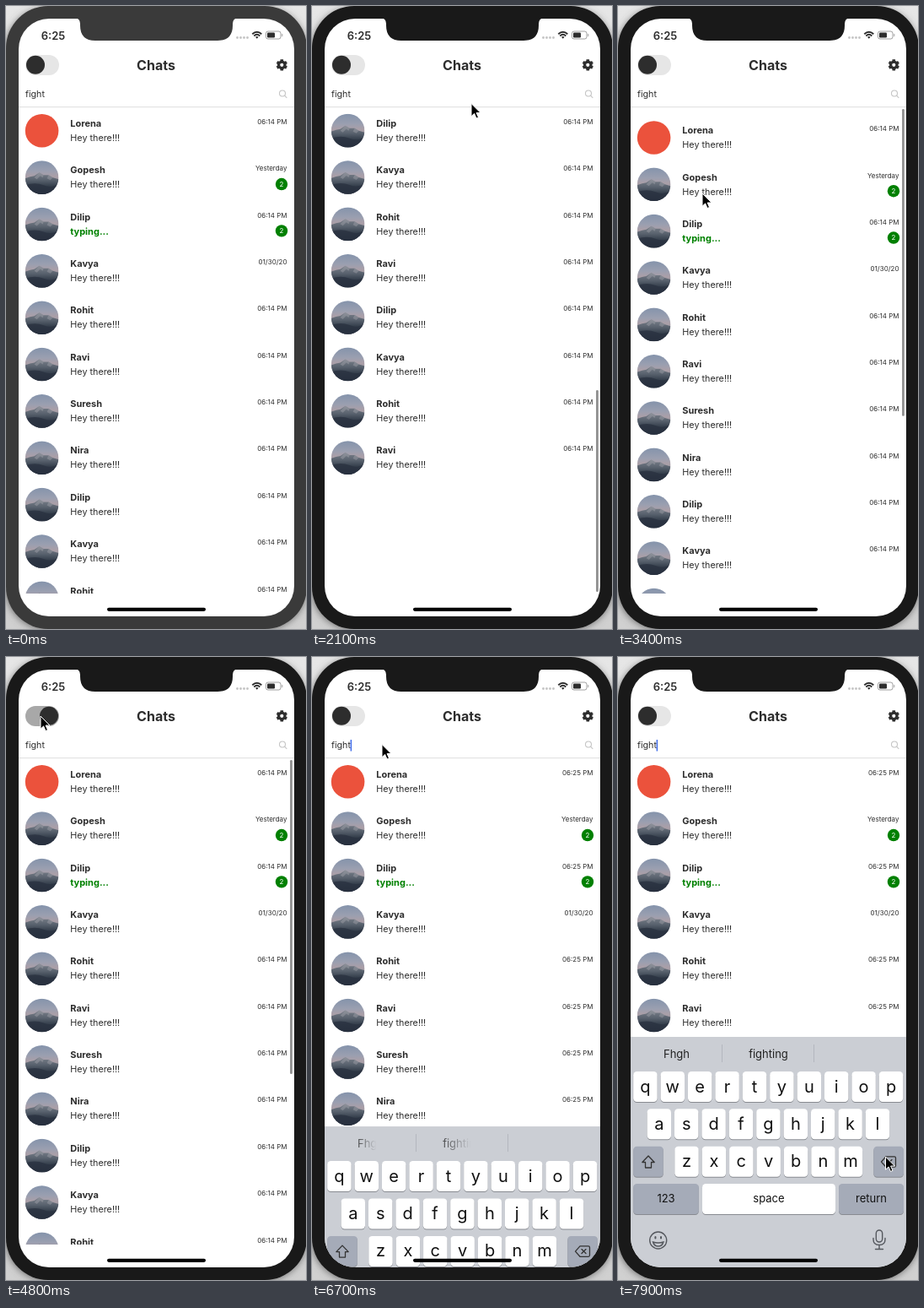
These frames come from a looping animation (356 px wide and 738 px high, 8 s). An HTML page:

```html
<!DOCTYPE html>
<html lang="en">
<head>
<meta charset="utf-8">
<title>Chat list</title>
<style>
html, body { margin: 0; width: 100%; height: 100%; overflow: hidden; background: #dcdcdc; }
svg { display: block; width: 100vw; height: 100vh; font-family: Inter, Roboto, sans-serif; }
.bg { fill: var(--bg); }
.fg { fill: var(--fg); }
.line { fill: none; stroke: #333; stroke-width: 1.3; stroke-linejoin: round; stroke-linecap: round; }
.mid { text-anchor: middle; }
.end { text-anchor: end; }
.name { font-size: 11px; font-weight: 700; }
.note { font-size: 10.8px; }
.time { font-size: 8px; }
.key { font-size: 20px; fill: #111; }
.label { font-size: 13px; fill: #111; }
</style>
</head>
<body>
<svg id="stage" viewBox="0 0 356 738" preserveAspectRatio="none">
  <defs>
    <linearGradient id="shade" x1="0" y1="0" x2="0" y2="1">
      <stop offset="0" stop-color="#e6e6e6"/><stop offset="1" stop-color="#d0d0d0"/>
    </linearGradient>
    <linearGradient id="sky" x1="0" y1="0" x2="0" y2="1">
      <stop offset="0" stop-color="#8493ab"/><stop offset=".3" stop-color="#9a9fb0"/>
      <stop offset=".46" stop-color="#aa9fa8"/><stop offset="1" stop-color="#8c8f99"/>
    </linearGradient>
    <linearGradient id="rock" x1="0" y1="0" x2="0" y2="1">
      <stop offset="0" stop-color="#7b818b"/><stop offset=".35" stop-color="#59626e"/>
      <stop offset=".6" stop-color="#38424f"/><stop offset="1" stop-color="#242d3b"/>
    </linearGradient>
    <linearGradient id="reveal">
      <stop offset="0" stop-color="#222"/><stop offset="1" stop-color="#222" stop-opacity="0"/>
    </linearGradient>
    <filter id="soft"><feGaussianBlur stdDeviation="5"/></filter>
    <clipPath id="round"><circle r="19.8"/></clipPath>
    <clipPath id="screen"><rect x="15" y="15" width="327" height="708" rx="36"/></clipPath>
    <clipPath id="view"><rect x="15" y="120" width="327" height="576"/></clipPath>
    <g id="photo" clip-path="url(#round)">
      <rect x="-20" y="-20" width="40" height="40" fill="url(#sky)"/>
      <path d="M-20 1L-14-1L-9-2L-3-6L2-3L8-3L13 0L20 2V20H-20Z" fill="url(#rock)"/>
      <path d="M-3-6L2-3L1 0L-2-2L-6 2L-9 0ZM8-3L13 0L10 3L6 1Z" fill="#a7a9b0" opacity=".4"/>
      <path d="M-20 9Q-8 5 2 9T20 7V20H-20Z" fill="#28313f" opacity=".75"/>
    </g>
  </defs>

  <rect width="356" height="738" fill="url(#shade)"/>
  <rect y="3" width="356" height="735" rx="50" fill="#555" filter="url(#soft)"/>
  <rect id="body" width="357" height="738" rx="50"/>

  <g clip-path="url(#screen)">
    <rect class="bg" x="15" y="15" width="327" height="708"/>
    <g clip-path="url(#view)"><g id="list"></g></g>
    <rect id="bar" x="337.1" width="2.7" rx="1.35" fill="#8d8d8d"/>

    <g class="fg">
      <text class="mid" x="56" y="39.5" font-size="13" font-weight="600">6:25</text>
      <text class="mid" x="178" y="75.7" font-size="16" font-weight="700">Chats</text>
      <text x="23" y="108.3" font-size="10.7">fight</text>
    </g>
    <g fill="#c5c5c5">
      <circle cx="274.5" cy="37.5" r="1.4"/><circle cx="278.5" cy="37.5" r="1.4"/>
      <circle cx="282.5" cy="37.5" r="1.4"/><circle cx="286.5" cy="37.5" r="1.4"/>
    </g>
    <g fill="none" stroke="var(--fg)">
      <path d="M292.3 33.2Q297.8 28.2 303.3 33.2M294.3 35.5Q297.8 32.2 301.3 35.5" stroke-width="1.9"/>
      <path d="M297.8 38.8L296 36.8Q297.8 35.4 299.6 36.8Z" fill="var(--fg)" stroke="none"/>
      <rect x="308.5" y="30" width="17.5" height="9" rx="2.4" stroke-opacity=".45"/>
      <rect x="310" y="31.5" width="9" height="6" rx="1.2" fill="var(--fg)" stroke="none"/>
      <path d="M327.8 33V36" stroke-opacity=".45"/>
      <g id="gear" transform="translate(327.3 69.8)">
        <circle r="3.7" stroke-width="3.2"/>
      </g>
    </g>
    <g fill="none" stroke="#c4c4c4" stroke-width="1.1">
      <circle cx="328" cy="103.5" r="3.5"/><path d="M330.6 106.1L333.3 108.8"/>
    </g>
    <path d="M15 119.7H342" stroke="#dedede"/>
    <rect id="track" x="23" y="58" width="40" height="24" rx="12"/>
    <circle id="knob" class="fg" cy="69.8" r="11"/>
    <rect id="caret" x="45.6" y="98" width="1.5" height="13.5" fill="#3f6bea"/>

    <g id="board"></g>
    <rect id="home" x="120" y="712.7" width="117" height="4.2" rx="2.1"/>
  </g>

  <path id="notch" d="M82 14Q88 15 88 21V23Q88 41 106 41H251Q269 41 269 23V21Q269 15 275 14Z"/>
  <path id="pointer" d="M0 0V15.2L3.6 11.9L6 17.5L8.5 16.4L6.1 11H11Z" fill="#000" stroke="#fff" stroke-linejoin="round"/>
</svg>

<script>
const LOOP = 8000, STEP = 100, PITCH = 55.35, MAX = 310, VIEW = 576;
const NS = "http://www.w3.org/2000/svg";
const $ = id => document.getElementById(id);
const stage = $("stage");

function add(parent, tag, attrs, text) {
  const el = document.createElementNS(NS, tag);
  for (const k in attrs) el.setAttribute(k, attrs[k]);
  if (text !== undefined) el.textContent = text;
  parent.appendChild(el);
  return el;
}
function set(id, attrs) {
  for (const k in attrs) $(id).setAttribute(k, attrs[k]);
}
const clamp = (v, a = 0, b = 1) => Math.min(b, Math.max(a, v));
const part = (t, a, b) => clamp((t - a) / (b - a));
const smooth = p => p * p * (3 - 2 * p);
const easeOut = p => 1 - (1 - p) ** 3;
const mix = (a, b, p) => a + (b - a) * p;

// Chat rows
const names = ("Lorena Gopesh Dilip Kavya Rohit Ravi Suresh Nira " +
  "Dilip Kavya Rohit Ravi Dilip Kavya Rohit Ravi").split(" ");
const clocks = [];
names.forEach((name, i) => {
  const row = add($("list"), "g", { transform: `translate(0 ${i * PITCH})` });
  if (i) add(row, "use", { href: "#photo", x: 42.6, y: 147.8 });
  else add(row, "circle", { cx: 42.6, cy: 147.8, r: 19.8, fill: "#eb523c" });
  add(row, "text", { class: "name fg", x: 76.3, y: 143 }, name);
  if (i === 2) add(row, "text", { class: "name", x: 76.3, y: 160, fill: "#008000" }, "typing...");
  else add(row, "text", { class: "note fg", x: 76.3, y: 160 }, "Hey there!!!");
  const day = { 1: "Yesterday", 3: "01/30/20" }[i];
  const label = add(row, "text", { class: "time fg end", x: 333.5, y: 140 }, day || "");
  if (!day) clocks.push(label);
  if (i === 1 || i === 2) {
    add(row, "circle", { cx: 327, cy: 155.7, r: 7.2, fill: "#008000" });
    add(row, "text", { class: "mid", x: 327, y: 158.5, "font-size": 8, fill: "#fff" }, "2");
  }
});

for (let a = 0; a < 360; a += 60)
  add($("gear"), "path", { d: "M0-4V-6.6", "stroke-width": 3.6, transform: `rotate(${a})` });

// Keyboard
const board = $("board");
function key(x, y, w, text, fill = "#fff", type = "label") {
  add(board, "rect", { x, y: y + 1, width: w, height: 36, rx: 4.2, fill: "#888b91" });
  add(board, "rect", { x, y, width: w, height: 36, rx: 4.2, fill });
  const drop = type === "key" ? 24.5 : 22.3;
  if (text) add(board, "text", { class: type + " mid", x: x + w / 2, y: y + drop }, text);
}
add(board, "rect", { x: 15, y: 450, width: 327, height: 274, fill: "#cbced4" });
add(board, "path", { d: "M123.5 459V480M232.5 459V480", stroke: "#b4b7be" });
const hints = [["Fhgh", 69.5], ["fighting", 178.5]].map(([word, x]) =>
  add(board, "text", { class: "mid", x, y: 474.5, "font-size": 13 }, word));
[["qwertyuiop", 18.2, 491], ["asdfghjkl", 34.6, 535.3], ["zxcvbnm", 67.3, 579.8]]
  .forEach(([keys, x, y]) =>
    [...keys].forEach((c, i) => key(x + i * 32.4, y, 28.4, c, "#fff", "key")));
const GREY = "#a5abb8";
key(18.2, 579.8, 35.6, "", GREY);
key(303.3, 579.8, 35.6, "", GREY);
key(18.2, 624, 77.6, "123", GREY);
key(100, 624, 158, "space");
key(262, 624, 77, "return", GREY);
add(board, "path", { class: "line", d: "M36 591L28.8 598.5H32.5V605H39.5V598.5H43.2Z" });
add(board, "path", { class: "line",
  d: "M312.5 598L318 591.8H328Q329.5 591.8 329.5 593.3V602.7Q329.5 604.2 328 604.2H318ZM320 595.5L325 600.5M325 595.5L320 600.5" });
const icons = add(board, "g", { fill: "none", stroke: "#55585e", "stroke-width": 1.4, "stroke-linecap": "round" });
add(icons, "circle", { cx: 47.7, cy: 691, r: 10 });
add(icons, "path", { d: "M41.5 693Q47.7 695 53.9 693Q52.5 698 47.7 698T41.5 693Z" });
add(icons, "path", { d: "M44.4 687V688.5M51 687V688.5", "stroke-width": 2 });
add(icons, "rect", { x: 306.3, y: 679, width: 7.4, height: 14, rx: 3.7 });
add(icons, "path", { d: "M303 688.5V690Q303 696.5 310 696.5T317 690V688.5M310 696.5V701.5M305.5 701.5H314.5" });

// Pointer stops: time, x, y
const path = [
  [300, 196, 734], [500, 196, 676], [1650, 196, 676], [2050, 189, 115.5], [2150, 189, 115.5],
  [2600, 190, 211], [2850, 190, 211], [3050, 165, 400], [3300, 100, 210], [3340, 100, 210],
  [3400, 100, 222], [3800, 118, 686], [3900, 118, 686], [4550, 41, 70], [6050, 41, 70],
  [6450, 83, 103.5], [6900, 83, 103.5], [7300, 332, 600], [7500, 317.5, 592], [8000, 317.5, 592]
];
function pointer(t) {
  const i = path.findIndex(p => p[0] > t);
  if (i < 1) return path[0].slice(1);
  const [a, b] = [path[i - 1], path[i]];
  const p = smooth(part(t, a[0], b[0]));
  return [mix(a[1], b[1], p), mix(a[2], b[2], p)];
}

// Overscroll resists the drag
const PULL = 0.69;
const band = x => x * PULL * VIEW / (VIEW + PULL * x);
function drag(s) {
  if (s < 0) return -band(-s);
  return s > MAX ? MAX + band(s - MAX) : s;
}
function scrollAt(t) {
  const y = pointer(t)[1];
  if (t < 1650) return 0;
  if (t < 2150) return drag(676 - y);
  if (t < 2850) return mix(drag(676 - 115.5), MAX, easeOut(part(t, 2150, 2700)));
  if (t < 3340) return MAX * (1 - smooth(part(t, 2850, 3280)));
  if (t < 3900) return drag(210 - y);
  return mix(drag(210 - 686), 0, easeOut(part(t, 3900, 4450)));
}

function draw(t) {
  const dark = t >= 4900 && t < 5900;
  stage.style.setProperty("--bg", dark ? "#333" : "#fff");
  stage.style.setProperty("--fg", dark ? "#fff" : "#2d2d2d");
  const shell = t < 1600 ? "#3a3a3a" : "#191919";
  set("body", { fill: shell });
  set("notch", { fill: shell });
  set("home", { fill: dark ? "#fff" : "#000" });

  const s = scrollAt(t);
  const over = Math.max(0, -s, s - MAX);
  set("list", { transform: `translate(0 ${-s})` });
  set("bar", {
    y: 122 + clamp(s / MAX) * 200 + (s > MAX ? over : 0),
    height: 372 - over,
    opacity: t < 1650 ? 0 : 1 - part(t, 4800, 5050)
  });
  const now = t < 4900 ? "06:14 PM" : "06:25 PM";
  clocks.forEach(c => { c.textContent = now; });

  const on = smooth(part(t, 4600, 4790)) - smooth(part(t, 5650, 5840));
  const grey = dark ? 120 : mix(230, 168, on);
  set("track", { fill: `rgb(${grey},${grey},${grey})` });
  set("knob", { cx: mix(35, 51, on) });

  const focus = t >= 6500;
  set("caret", { opacity: focus && !(t >= 7100 && t < 7600) ? 1 : 0 });
  const rise = easeOut(part(t, 6600, 6970));
  board.setAttribute("transform", `translate(0 ${273 * (1 - rise)})`);
  board.setAttribute("visibility", focus ? "visible" : "hidden");
  const shown = part(t, 6650, 6900);
  const stops = $("reveal").children;
  stops[0].setAttribute("offset", Math.max(0, shown * 1.6 - 0.6));
  stops[1].setAttribute("offset", Math.min(1, 0.4 + shown * 1.6));
  hints.forEach(h => {
    h.setAttribute("fill", shown < 1 ? "url(#reveal)" : "#222");
    h.setAttribute("opacity", mix(0.7, 1, shown));
  });

  const [x, y] = pointer(t);
  set("pointer", { transform: `translate(${x} ${y})`, visibility: t < 300 ? "hidden" : "visible" });
}

function tick() {
  draw(Math.floor(performance.now() % LOOP / STEP) * STEP);
  requestAnimationFrame(tick);
}
tick();
</script>
</body>
</html>
```
